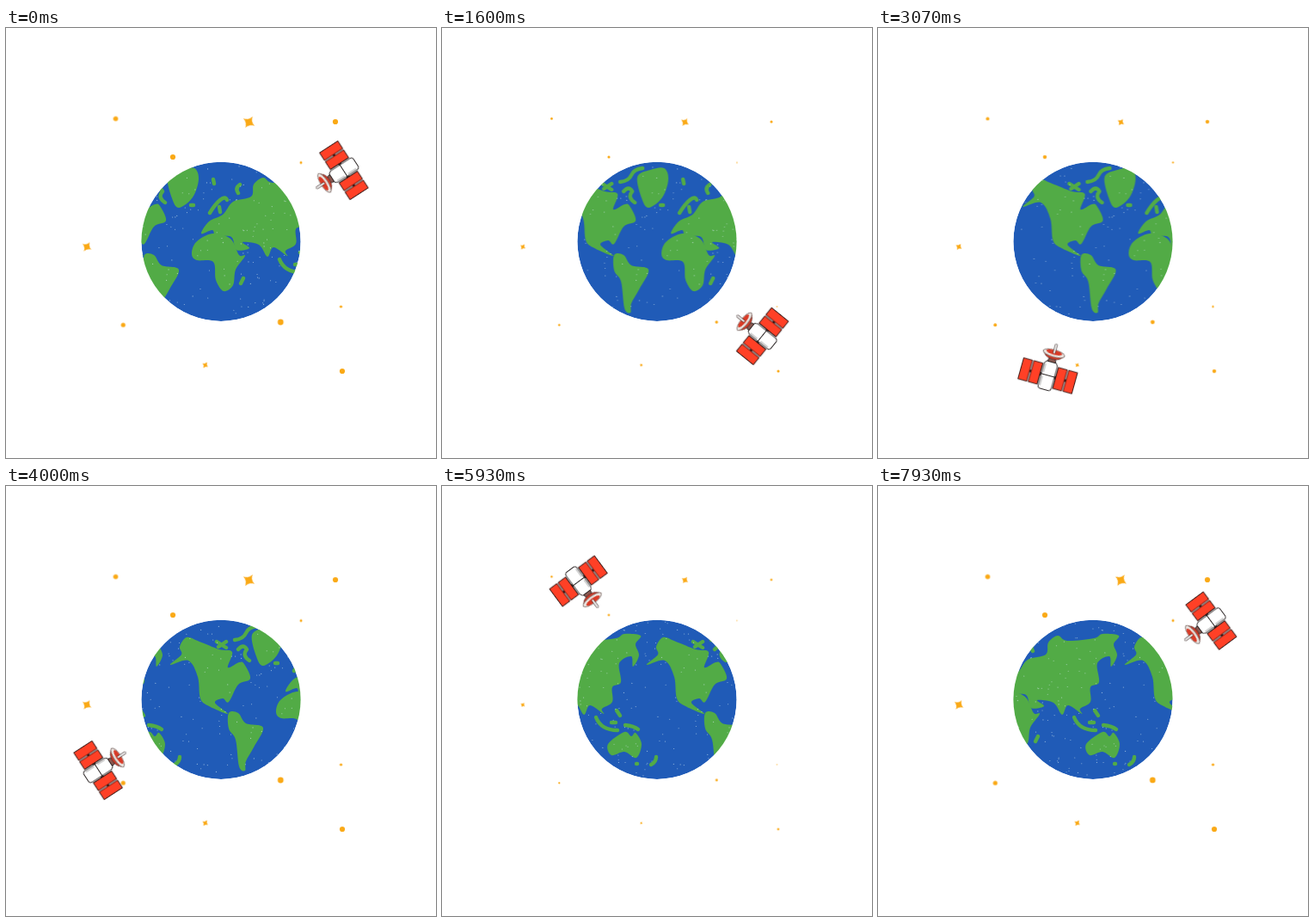
These frames come from a looping animation (500x500 px, 8 s). An HTML page:

```html
<!DOCTYPE html>
<html lang="en">
<head>
<meta charset="utf-8">
<title>Satellite around the Earth</title>
<style>
  html, body { margin: 0; width: 100%; height: 100%; overflow: hidden; background: #fff; }
  svg { display: block; width: 100vw; height: 100vh; }
  #orbit { transform-origin: 250px 248px; }
</style>
</head>
<body>
<svg viewBox="0 0 500 500">
  <defs>
    <clipPath id="disc"><circle cx="250" cy="248.3" r="92.6"/></clipPath>
    <g id="panel" stroke="#301512" stroke-width=".9">
      <path d="M-12 0H12" stroke-width="3"/>
      <rect x="-11.5" y="-12.7" width="10.6" height="25.4" fill="#ff4026"/>
      <rect x=".9" y="-12.7" width="10.6" height="25.4" fill="#ff4026"/>
    </g>
  </defs>
  <g id="stars" fill="#faa916"></g>
  <g clip-path="url(#disc)">
    <circle cx="250" cy="248.3" r="92.6" fill="#205bb7"/>
    <g id="world">
      <g id="map" fill="#52ab46">
        <!-- Islands and peninsulas as short rounded strokes -->
        <path fill="none" stroke="#52ab46" stroke-width="4.4" stroke-linecap="round" stroke-linejoin="round"
          d="M237 215Q243 205 249 200T257 200M248 208L249 214
             M168 179Q178 178 181 171T194 163M172 190Q178 183 182 190Q176 197 185 203
             M147 181L158 188M158 181L149 187M241 176L242 181M272 182Q266 186 270 192
             M215 206H218M276 291L273 297M318 269Q324 284 343 284M336 275H341
             M342 261L346 267M352 278Q362 279 367 283M388 315Q388 321 382 324M365 323H366"/>
      </g>
      <use href="#map" x="-284"/>
    </g>
  </g>
  <g id="orbit">
    <g transform="translate(250 83) rotate(-3)" stroke-linejoin="round">
      <path d="M-12 0H12" stroke="#33211f" stroke-width="4"/>
      <use href="#panel" x="-21"/>
      <use href="#panel" x="21"/>
      <g fill="#fff" stroke="#2b2525" stroke-width="1">
        <path d="M-5 16H5L3 23H-3Z" fill="#8c5a52"/>
        <path d="M-8 -13Q-8 -16.5 -5 -16.5H5Q8 -16.5 8 -13V13L6 16.5H-6L-8 13Z"/>
        <path d="M-8 .5H8"/>
      </g>
      <path d="M6 -13V-2M6 3V13" stroke="#c9c9c9" stroke-width="1.6"/>
      <path d="M-12.5 27Q-9 20 0 20T12.5 27Z" fill="#d93a26" stroke="#4b2a26" stroke-width=".7"/>
      <ellipse cy="27" rx="13" ry="4.2" fill="#ece6e2" stroke="#5a4540" stroke-width=".7"/>
      <ellipse cy="28.2" rx="9.5" ry="2.8" fill="#d93a26"/>
      <path d="M0 28V37" stroke="#5a4a48" stroke-width="3.2" stroke-linecap="round"/>
      <path d="M0 28V37" stroke="#eee" stroke-width="1.8" stroke-linecap="round"/>
    </g>
  </g>
</svg>
<script>
const LOOP = 8000, PULSE = 4000, FRAME = 40, PERIOD = 284, DRIFT = 196;
const $ = id => document.getElementById(id);

function add(parent, tag, attrs = {}) {
  const el = document.createElementNS('http://www.w3.org/2000/svg', tag);
  for (const key in attrs) el.setAttribute(key, attrs[key]);
  return parent.appendChild(el);
}

// Closed Catmull-Rom curve through "x,y x,y ..."
function smooth(text) {
  const p = text.split(' ').map(s => s.split(',').map(Number));
  const at = i => p[(i + p.length) % p.length];
  const ctrl = (a, from, to) => a.map((v, k) => (v + (to[k] - from[k]) / 6).toFixed(1));
  return 'M' + p[0] + p.map((a, i) => {
    const b = at(i + 1);
    return `C${ctrl(a, at(i - 1), b)} ${ctrl(b, at(i + 2), a)} ${b}`;
  }).join('') + 'Z';
}

const land = {
  eurasia: '227,239 236,225 252,217 264,202 285,196 288,182 299,174 310,180 341,177 351,172 ' +
    '370,174 364,184 368,197 361,210 359,198 345,206 347,228 337,234 337,251 325,259 327,265 ' +
    '311,255 304,266 294,252 275,249 283,256 268,258 262,243 244,242 240,235',
  africa: '216,263 221,249 240,239 261,245 271,264 278,265 267,281 264,299 253,306 244,293 241,272 222,270',
  northAmerica: '93,208 106,196 104,187 112,176 127,181 150,190 165,193 160,211 173,205 179,207 ' +
    '186,224 172,231 161,251 154,247 145,252 160,265 138,256 128,247 125,222 114,203',
  southAmerica: '161,264 172,264 181,276 201,281 190,304 181,320 180,331 173,326 169,295 161,282',
  greenland: '188,173 203,165 219,163 224,176 217,197 201,209 193,198',
  australia: '332,300 351,286 359,291 364,287 371,300 365,316 351,309 336,313'
};

const map = $('map');
for (const name in land) add(map, 'path', { d: smooth(land[name]) });

// Scattered pale specks that travel with the map
let seed = 7;
const random = () => (seed = seed * 16807 % 2147483647) / 2147483647;
const speck = () => `M${(93 + random() * PERIOD).toFixed(1)} ${(158 + random() * 180).toFixed(1)}h.1`;
add(map, 'path', {
  d: Array.from({ length: 230 }, speck).join(''),
  stroke: '#d5ebf2', 'stroke-width': 1.1, 'stroke-linecap': 'round', opacity: .6
});

// Four-pointed star with curved sides
const spark = r => `M0 ${-r}Q${r * .2} ${-r * .2} ${r} 0Q${r * .2} ${r * .2} 0 ${r}` +
  `Q${-r * .2} ${r * .2} ${-r} 0Q${-r * .2} ${-r * .2} 0 ${-r}Z`;

// Motion advances in whole frames at 25 per second
const play = (el, frames, duration, delay = 0) => el.animate(frames, {
  duration, delay: delay - FRAME / 4, iterations: Infinity, easing: `steps(${duration / FRAME})`
});

// x, y, radius; larger stars are sparks and pulse a little later
const stars = [
  [127.5, 105.5, 2.8], [282.5, 109.5, 8.3], [383, 109, 3.1], [194, 150, 3.1],
  [343, 156.5, 1.5], [94, 254.5, 6.4], [389.5, 324, 1.6], [319.3, 342, 3.4],
  [136.3, 345.3, 2.6], [231.7, 392, 3.9], [391, 399, 3.1]
];

for (const [x, y, r] of stars) {
  const place = add($('stars'), 'g', { transform: `translate(${x} ${y})` });
  const pulse = add(place, 'g');
  if (r > 3.5) add(pulse, 'path', { d: spark(r), transform: 'rotate(33)' });
  else add(pulse, 'circle', { r });
  const easing = 'cubic-bezier(.37,0,.63,1)';
  play(pulse, [
    { transform: 'scale(1)', easing },
    { transform: 'scale(.42)', easing },
    { transform: 'scale(1)' }
  ], PULSE, 6 * r * r - PULSE);
}

play($('world'), [
  { transform: 'translateX(0px)' },
  { transform: `translateX(${DRIFT}px)` }
], LOOP);
play($('orbit'), [{ transform: 'rotate(60deg)' }, { transform: 'rotate(420deg)' }], LOOP);
</script>
</body>
</html>
```
